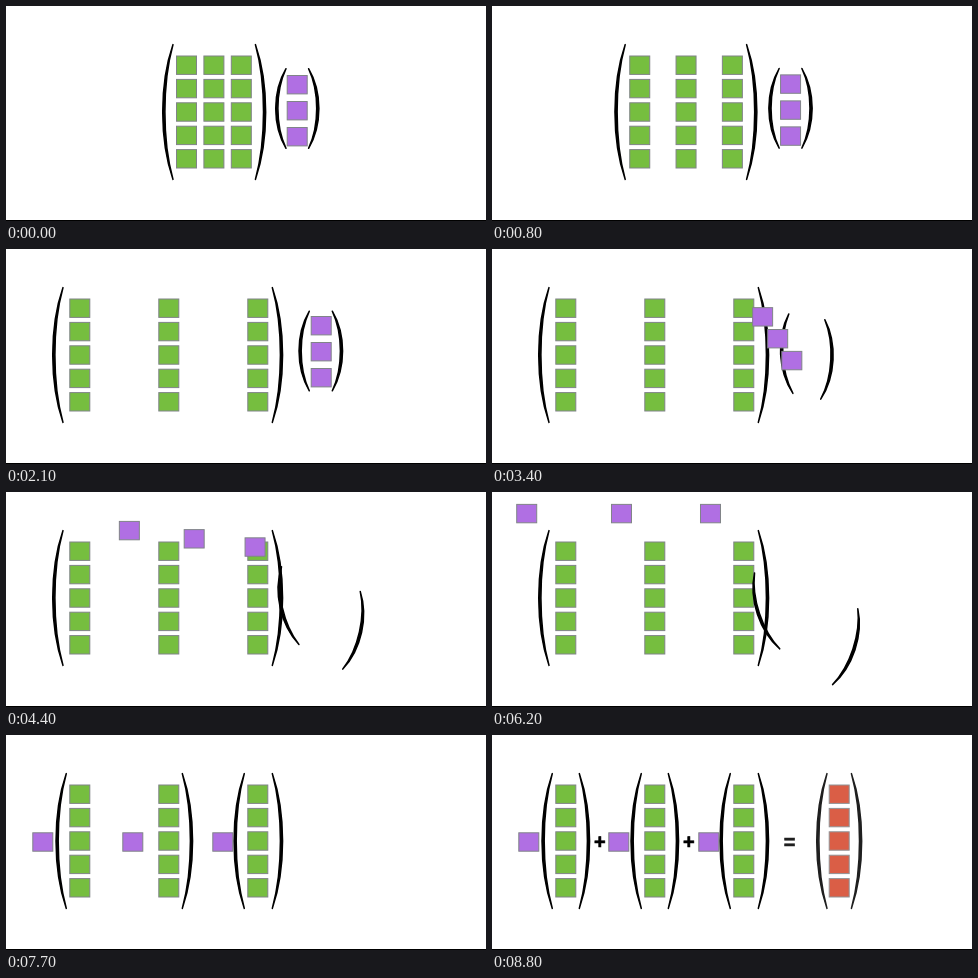
Write an HTML page that moves like this. It is 480 by 215 pixels and loops after 8.9 s.

```html
<!DOCTYPE html>
<html lang="en">
<head>
<meta charset="utf-8">
<title>Matrix times vector</title>
<style>
html, body { margin: 0; width: 100%; height: 100%; overflow: hidden; background: #fff; }
svg { display: block; width: 100vw; height: 100vh; }
rect.cell { stroke: #808488; stroke-width: 1; }
path { stroke: #000; stroke-width: 1.5; stroke-linejoin: round; }
text { font: bold 20px "Liberation Sans", Arial, sans-serif; text-anchor: middle; stroke: #000; stroke-width: .6; }
</style>
</head>
<body>
<svg id="stage" viewBox="0 0 480 215">
  <rect y="214" width="480" height="1"/>
</svg>
<script>
const LOOP = 8900, STEP = 100;
const GREEN = '#76be3f', PURPLE = '#b06fe3', RED = '#d5482c';
const MID = 106, PITCH = 23.4, GAP = 13.5;
const stage = document.getElementById('stage');

function add(parent, tag, attrs = {}) {
  const el = document.createElementNS('http://www.w3.org/2000/svg', tag);
  for (const k in attrs) el.setAttribute(k, attrs[k]);
  return parent.appendChild(el);
}

const range = n => [...Array(n).keys()];
const clamp = v => Math.min(1, Math.max(0, v));

// Shapes are centred on their own origin
function cell(parent, fill, y = 0) {
  return add(parent, 'rect', { class: 'cell', x: -10, y: y - 9.2, width: 20, height: 18.4, fill });
}

function column(parent, fill) {
  const g = add(parent, 'g');
  range(5).forEach(i => cell(g, fill, (i - 2) * PITCH));
  return g;
}

// Bulges to side (-1 left, 1 right), tips on x = 0
function bracketPath(side, half) {
  const h = half - .6, c = h * .42;
  const out = side * 13.7, inner = side * 10.8;
  return `M0 ${-h}C${out} ${-c} ${out} ${c} 0 ${h}C${inner} ${c} ${inner} ${-c} 0 ${-h}Z`;
}

function place(el, x, y, angle = 0) {
  el.setAttribute('transform', `translate(${x} ${y}) rotate(${angle})`);
}

function bracket(parent, side, x, half = 68) {
  const el = add(parent, 'path', { d: bracketPath(side, half) });
  place(el, x, MID);
  return el;
}

function sign(parent, x, char) {
  add(parent, 'text', { x, y: 113.6 }).textContent = char;
}

// Column centres while packed and while spread
const packed = i => 180.5 + 27.4 * i;
const spread = i => 73.8 + 89 * i;

// Each part has four poses [x, y, angle, half]: packed, spread, lifted, placed
const at = (x, y = MID) => [x, y, 0, 0];
const tall = x => [x, MID, 0, 68];
const short = (x, y, angle = 0) => [x, y, angle, 40.4];

const left = tall(57), right = tall(spread(2) + 14.5);
const parts = [
  ...range(3).map(i => {
    const end = at(spread(i));
    return { el: column(stage, GREEN), poses: [at(packed(i)), end, end, end] };
  }),
  { side: -1, poses: [tall(packed(0) - GAP), left, left, tall(spread(0) - GAP)] },
  { side: 1, poses: [tall(packed(2) + GAP + .6), right, right, right] },
  { side: -1, poses: [short(280, 102.5), short(303.3, 102), short(275.4, 119, -18.5), tall(spread(2) - GAP)] },
  { side: 1, poses: [short(302.6, 102.5), short(326.3, 102), short(354.4, 155, 18.5), tall(spread(1) + GAP)] },
  ...[34.7, 129.5, 218.5].map((lifted, i) => ({
    el: cell(stage, PURPLE),
    poses: [at(291.2, 78.7 + 26 * i), at(315.2, 76.7 + 26 * i), at(lifted, 21), at(36.8 + 90 * i, MID + 1)]
  }))
];
for (const p of parts) {
  if (p.side) p.el = bracket(stage, p.side, 0);
}
// Scalars pass in front of the brackets
parts.slice(-3).forEach(p => stage.appendChild(p.el));

const terms = add(stage, 'g');
range(2).forEach(i => sign(terms, spread(i) + 34, '+'));
bracket(terms, 1, spread(0) + GAP);
bracket(terms, -1, spread(1) - GAP);

const result = add(stage, 'g');
sign(result, 297.5, '=');
for (const side of [-1, 1]) bracket(result, side, 347.2 + side * 12.2);
place(column(result, RED), 347.2, MID);

// cubic-bezier(.42, 0, .58, 1)
function ease(x) {
  if (x <= 0 || x >= 1) return clamp(x);
  let lo = 0, hi = 1, s;
  for (let i = 0; i < 24; i++) {
    s = (lo + hi) / 2;
    const r = 1 - s;
    if (1.26 * s * r * r + 1.74 * s * s * r + s ** 3 < x) lo = s; else hi = s;
  }
  return s * s * (3 - 2 * s);
}

function poseAt(poses, u) {
  const i = Math.min(Math.floor(u), poses.length - 2);
  return poses[i].map((v, k) => v + (poses[i + 1][k] - v) * (u - i));
}

function draw(t) {
  const u = ease((t - 20) / 2030) + ease((t - 2570) / 3000) + ease((t - 6112) / 1480);
  for (const { el, side, poses } of parts) {
    const [x, y, angle, half] = poseAt(poses, u);
    place(el, x, y, angle);
    if (side) el.setAttribute('d', bracketPath(side, half));
  }
  terms.setAttribute('opacity', clamp((t - 8250) / 500));
  result.setAttribute('opacity', clamp((t - 8250) / 630));
}

const began = performance.now();
function tick() {
  const t = (performance.now() - began) % LOOP;
  draw(Math.floor(t / STEP) * STEP);
  requestAnimationFrame(tick);
}
tick();
</script>
</body>
</html>
```
